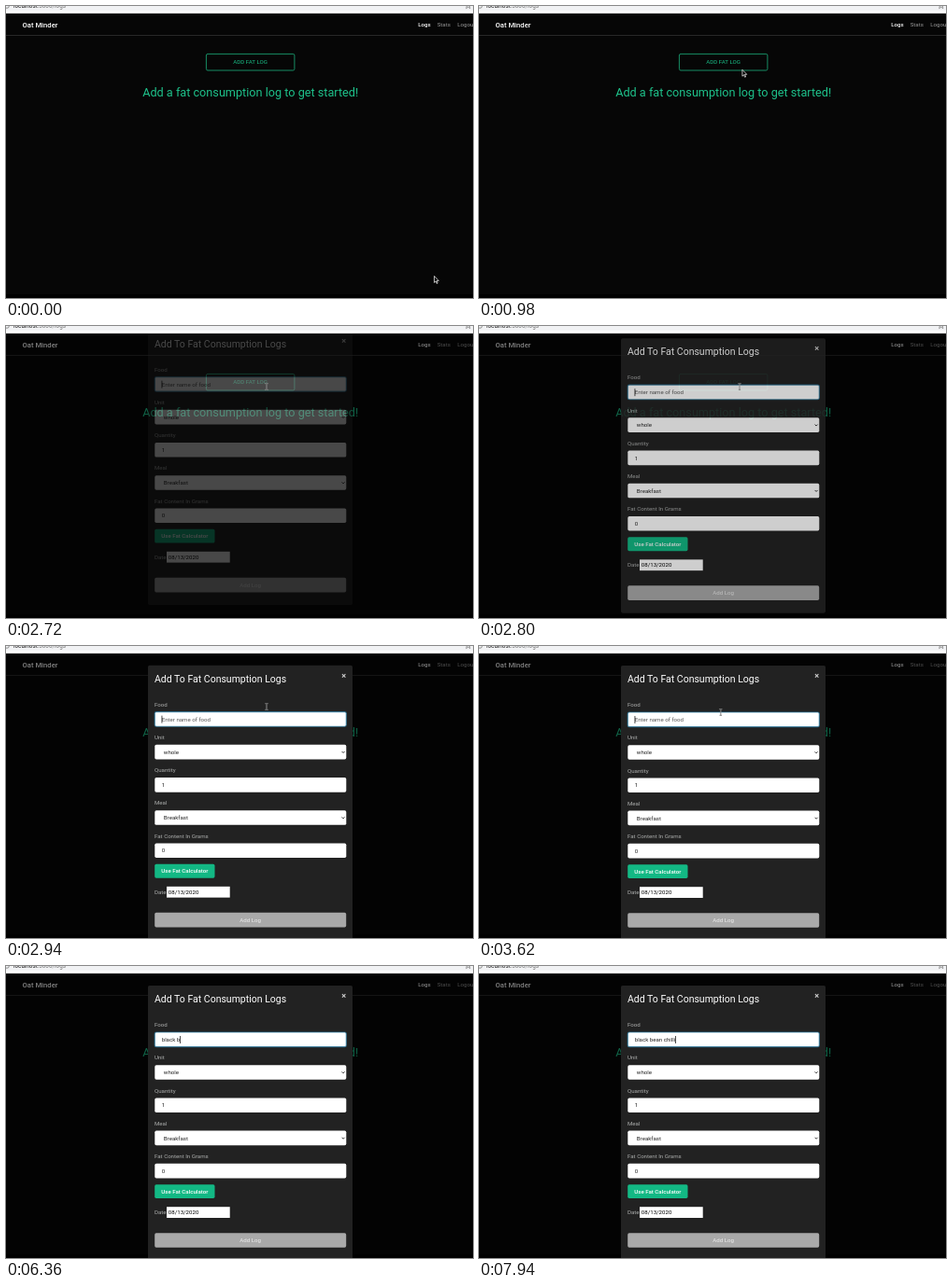
An HTML page for the animation above (8.38 s loop, 500 px wide and 313 px high).

```html
<!DOCTYPE html>
<html lang="en">
<head>
<meta charset="utf-8">
<title>Food log</title>
<style>
  html, body { margin: 0; width: 100%; height: 100%; overflow: hidden; background: #000; }
  svg { display: block; width: 100%; height: 100%; font: 6.13px Roboto, sans-serif; }
  text { white-space: pre; }
  .mid { text-anchor: middle; }
  .med { font-weight: 500; }
  .label { fill: #adafae; }
  .value { fill: #222; }
</style>
</head>
<body>
<svg viewBox="0 0 500 313">
  <defs><clipPath id="view"><rect y="8" width="500" height="305"/></clipPath></defs>

  <g clip-path="url(#view)">
    <rect width="500" height="309" fill="#060606"/>
    <rect y="31" width="500" height="1" fill="#282828"/>
    <text x="17.5" y="22.8" class="med" font-size="7.66" fill="#fff">Oat Minder</text>
    <text x="441.3" y="22" class="med" fill="#fff">Logs</text>
    <text x="461.7" y="22" fill="#999">Stats</text>
    <text x="483.2" y="22" fill="#999">Logout</text>
    <rect x="214.4" y="51.4" width="94.5" height="17.6" rx="1.6" fill="none" stroke="#1a9c70" stroke-width=".9"/>
    <text x="261.6" y="62.2" class="mid" fill="#1bc48b">ADD FAT LOG</text>
    <text x="261.7" y="97" class="mid" font-size="12.68" fill="#1ec28b">Add a fat consumption log to get started!</text>
    <rect id="shade" width="500" height="313"/>

    <g id="modal">
      <rect x="152" y="21" width="219" height="294.5" rx="1.8" fill="#222"/>
      <text x="159" y="39" font-size="10.5" fill="#fff">Add To Fat Consumption Logs</text>
      <text x="361.6" y="35" class="mid" font-size="9.2" font-weight="700" fill="#ccc">×</text>
      <g id="fields"></g>
      <rect x="159.2" y="234.2" width="64.3" height="14.8" rx="1.7" fill="#13b884"/>
      <text x="191.3" y="243.8" class="mid med" fill="#fff">Use Fat Calculator</text>
      <text x="159" y="266.2" class="label">Date</text>
      <rect x="172" y="258.2" width="67.7" height="11.8" fill="#fff"/>
      <text x="173.8" y="266.3" fill="#000">08/13/2020</text>
      <rect x="159.2" y="286.2" width="205" height="15.6" rx="1.7" fill="#a9a9a9"/>
      <text x="261.7" y="296.2" class="mid" fill="#eee">Add Log</text>
      <rect id="caret" y="75" width=".7" height="8" fill="#000"/>
    </g>
  </g>

  <rect width="500" height="8" fill="#fff"/>
  <rect width="500" height="5" fill="#f1f2f4"/>
  <circle cx="1" cy="0" r="2.3" fill="none" stroke="#666" stroke-width=".7"/>
  <text x="8" y="2.2" font-size="6.3" fill="#222">localhost<tspan fill="#777">:3000/logs</tspan></text>
  <path d="M492.7 2.6l.6-2.8h3l.6 2.8-2.1-1.3z" fill="none" stroke="#666" stroke-width=".6"/>

  <path id="arrow" d="M0 0v7l1.6-1.5 1.1 2.5 1-.4-1.1-2.5h2.2z" stroke="#fff" stroke-width=".7"/>
  <g id="beam" fill="none">
    <path d="M-1.5-3.3h3M0-3.3v6.6M-1.5 3.3h3" stroke="#ddd" stroke-width="1.2" opacity=".6"/>
    <path d="M-1.2-3.3h2.4M0-3.3v6.6M-1.2 3.3h2.4" stroke="#333" stroke-width=".5"/>
  </g>
</svg>

<script>
const LOOP = 8380;
const TEXT = 'black bean chilli';
const KEYS = [5080, 5200, 5360, 5520, 5560, 5720, 6360, 6500, 6620, 6740,
              6960, 7220, 7360, 7480, 7600, 7760, 7940];
const OPEN = 2680, TYPE = KEYS[0];
const $ = id => document.getElementById(id);

const field = ([label, value, isSelect], i) => {
  const y = 65.2 + i * 35.2;
  return `<text x="159" y="${y}" class="label">${label}</text>
    <rect x="159.3" y="${y + 5.8}" width="205" height="15.6" rx="1.7" fill="#fff"
      ${i ? '' : 'stroke="#2a7fa8" stroke-width="1.2" stroke-opacity=".7"'}/>
    <text x="${isSelect ? 168.8 : 166.7}" y="${y + 15.8}" class="value" ${i ? '' : 'id="food"'}>${value}</text>
    ${isSelect ? `<path d="M359.6 ${y + 13}l1.5 1.5 1.5-1.5" fill="none" stroke="#222" stroke-width=".9"/>` : ''}`;
};
$('fields').innerHTML = [
  ['Food', ''], ['Unit', 'whole', true], ['Quantity', '1'],
  ['Meal', 'Breakfast', true], ['Fat Content In Grams', '0'],
].map(field).join('');
const food = $('food');

const span = (t, from, to) => Math.min(1, Math.max(0, (t - from) / (to - from)));
const smooth = p => p * p * (3 - 2 * p);
const easeOut = p => 1 - (1 - p) ** 2;

// Pointer waypoints: start, end, easing, dx, dy
const MOVES = [
  [20, 860, smooth, -175, -219.5],
  [900, 1320, easeOut, -4.5, -5],
  [3440, 4180, easeOut, -47, 14],
];

function pointer(t) {
  let x = 458.5, y = 289.5;
  for (const [from, to, ease, dx, dy] of MOVES) {
    const p = ease(span(t, from, to));
    x += dx * p;
    y += dy * p;
  }
  return `translate(${x} ${y})`;
}

function draw(t) {
  const at = pointer(t), isBeam = t >= 1200;
  $('arrow').setAttribute('transform', at);
  $('beam').setAttribute('transform', at);
  $('arrow').setAttribute('visibility', isBeam ? 'hidden' : 'visible');
  $('beam').setAttribute('visibility', isBeam && t < TYPE ? 'visible' : 'hidden');

  $('shade').setAttribute('opacity', span(t, OPEN - 150, OPEN) / 2);
  $('modal').setAttribute('opacity', span(t, OPEN, OPEN + 150));
  $('modal').setAttribute('transform', `translate(0 ${-22 * (1 - easeOut(span(t, OPEN, OPEN + 300)))})`);

  const typed = KEYS.filter(k => k <= t).length;
  food.textContent = typed ? TEXT.slice(0, typed) : 'Enter name of food';
  food.style.fill = typed ? '#222' : '#555';
  const width = typed ? food.getSubStringLength(0, typed) : 0;
  const isOn = typed || t < 3200 || Math.floor((t - 3200) / 500) % 2 === 0;
  $('caret').setAttribute('x', 166.6 + width);
  $('caret').setAttribute('visibility', isOn ? 'visible' : 'hidden');
}

const start = performance.now();
function tick() {
  draw((performance.now() - start) % LOOP);
  requestAnimationFrame(tick);
}
tick();
</script>
</body>
</html>
```
